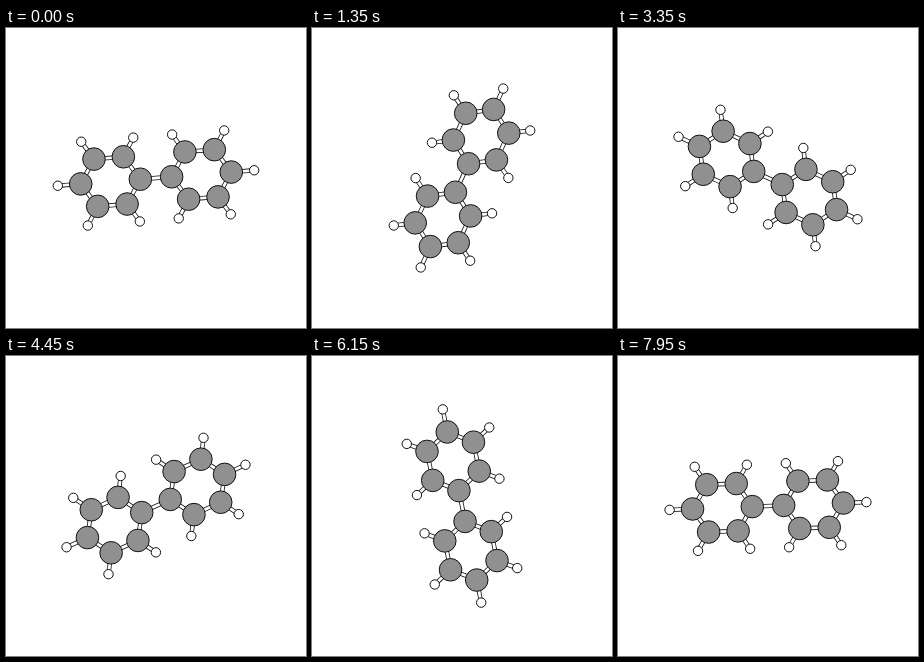
An HTML page for the animation above (8 s loop, 300 by 300 pixels).

```html
<!DOCTYPE html>
<html lang="en">
<head>
<meta charset="utf-8">
<title>Rotating biphenyl</title>
<style>
  html, body { margin: 0; width: 100%; height: 100%; overflow: hidden; background: #fff; }
  svg { display: block; width: 100%; height: 100%; }
  .edge { stroke: #111; stroke-width: 4.4; }
  .core { stroke: #fff; stroke-width: 2.8; }
  circle { stroke: #111; stroke-width: 1; }
  .carbon { fill: #909090; }
  .hydrogen { fill: #fff; }
</style>
</head>
<body>
<svg viewBox="0 0 300 300"></svg>
<script>
const LOOP = 8000, STEP = 50, START_ANGLE = 4.5;
const CENTER = 150, RING_OFFSET = 45.6;
const CARBON_RADIUS = 11.3, HYDROGEN_RADIUS = 4.7;
const svg = document.querySelector('svg');

function add(tag, attrs) {
  const node = document.createElementNS('http://www.w3.org/2000/svg', tag);
  for (const key in attrs) node.setAttribute(key, attrs[key]);
  return svg.appendChild(node);
}

// Corners of a ring tilted about its long axis, ordered from the para corner.
function ringPoints(side, reach, along, across) {
  return [[reach, 0], [along, across], [-along, across],
          [-reach, 0], [-along, -across], [along, -across]]
    .map(([x, y]) => ({ x: side * (RING_OFFSET + x), y: side * y }));
}

const carbons = [], hydrogens = [], bonds = [], joints = [];
for (const side of [-1, 1]) {
  const ring = ringPoints(side, 29.9, 14.75, 23.7);
  const outer = ringPoints(side, 52.9, 26.1, 42.05);
  ring.forEach((carbon, i) => {
    carbons.push(carbon);
    bonds.push([carbon, ring[(i + 1) % 6]]);
    if (i === 3) {
      joints.push(carbon);
    } else {
      hydrogens.push(outer[i]);
      bonds.push([carbon, outer[i]]);
    }
  });
}
bonds.push(joints);

const lines = bonds.flatMap(ends =>
  ['edge', 'core'].map(name => ({ ends, node: add('line', { class: name }) })));
const makeAtoms = (points, name, r) =>
  points.map(point => ({ point, node: add('circle', { class: name, r }) }));
const atoms = [
  ...makeAtoms(carbons, 'carbon', CARBON_RADIUS),
  ...makeAtoms(hydrogens, 'hydrogen', HYDROGEN_RADIUS)
];

function draw(time) {
  const turn = Math.floor((time % LOOP) / STEP) * STEP / LOOP;
  const angle = (START_ANGLE + 360 * turn) * Math.PI / 180;
  const cos = Math.cos(angle), sin = Math.sin(angle);
  const place = ({ x, y }) => [CENTER + x * cos + y * sin, CENTER - x * sin + y * cos];

  for (const { ends, node } of lines) {
    ends.forEach((end, i) => {
      const [x, y] = place(end);
      node.setAttribute('x' + (i + 1), x);
      node.setAttribute('y' + (i + 1), y);
    });
  }
  for (const { point, node } of atoms) {
    const [x, y] = place(point);
    node.setAttribute('cx', x);
    node.setAttribute('cy', y);
  }
}

const begin = performance.now();
function tick() {
  draw(performance.now() - begin);
  requestAnimationFrame(tick);
}
tick();
</script>
</body>
</html>
```
